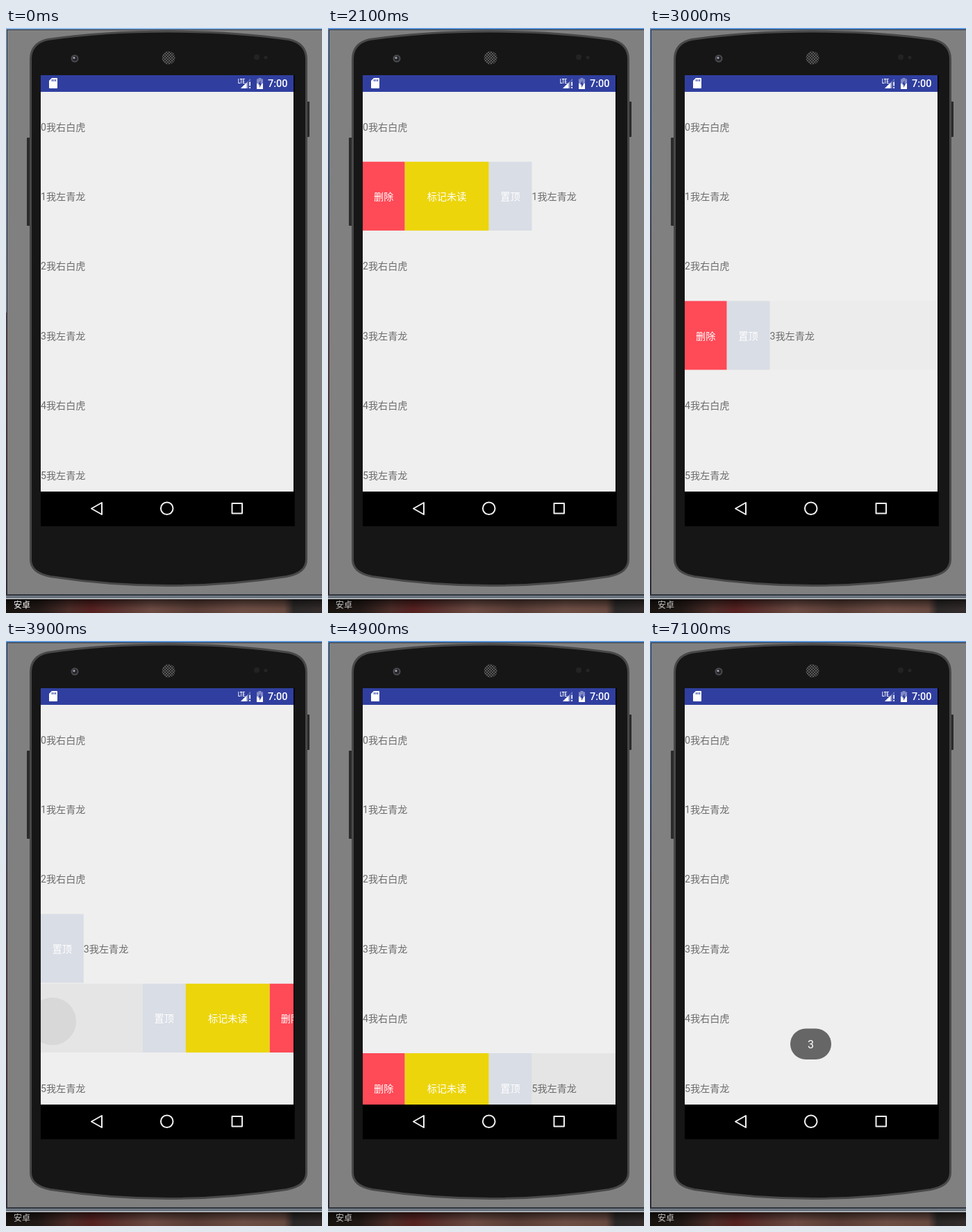
Write an HTML page that moves like this. It is 455 px wide and 843 px high and loops after 8 s.

```html
<!DOCTYPE html>
<html lang="zh">
<head>
<meta charset="utf-8">
<title>Swipe menu</title>
<style>
html, body { margin: 0; width: 100%; height: 100%; overflow: hidden; background: #808080; }
svg { display: block; }
text { font: 14.15px Roboto, "Noto Sans CJK SC", "Noto Sans CJK", sans-serif; }
.label { fill: #fff; text-anchor: middle; }
.item { fill: #6c6c6c; }
</style>
</head>
<body>
<svg id="stage" width="455" height="843" viewBox="0 0 455 843">
  <defs>
    <linearGradient id="desk" x2="0" y2="1">
      <stop stop-color="#5b93d6"/><stop offset=".23" stop-color="#3c6cae"/>
      <stop offset=".4" stop-color="#5c4a55"/><stop offset=".6" stop-color="#6d3c3c"/>
      <stop offset="1" stop-color="#30242a"/>
    </linearGradient>
    <linearGradient id="bar">
      <stop stop-color="#17130f"/><stop offset=".1" stop-color="#201815"/>
      <stop offset=".2" stop-color="#4b2c28"/><stop offset=".27" stop-color="#54201f"/>
      <stop offset=".36" stop-color="#5a3430"/><stop offset=".46" stop-color="#6b4a42"/>
      <stop offset=".6" stop-color="#583c35"/><stop offset=".75" stop-color="#6c4d44"/>
      <stop offset=".88" stop-color="#66483f"/><stop offset=".91" stop-color="#2a2727"/>
      <stop offset="1" stop-color="#332c2b"/>
    </linearGradient>
    <linearGradient id="shade" x2="0" y2="1">
      <stop stop-opacity=".55"/><stop offset=".7" stop-opacity="0"/>
    </linearGradient>
    <pattern id="mesh" width="4" height="4" patternUnits="userSpaceOnUse">
      <rect width="4" height="4" fill="#222"/>
      <circle cx="1" cy="1" r="1" fill="#6a6a6a"/><circle cx="3" cy="3" r="1" fill="#6a6a6a"/>
    </pattern>
  </defs>

  <!-- desktop and emulator window -->
  <rect width="455" height="843" fill="url(#desk)"/>
  <rect id="glow" width="455" height="410" fill="#a9ccf2" opacity=".6"/>
  <rect x="1.5" y="2.5" width="460" height="814" fill="#808080" stroke="#2b2f38"/>
  <rect y="817" width="455" height="6" fill="#6e7781"/>
  <path d="M0 817.5H455" stroke="#3a4048"/>
  <path d="M0 822.5H455" stroke="#dfe5ea"/>
  <rect y="823" width="455" height="20" fill="url(#bar)"/>
  <rect y="823" width="455" height="20" fill="url(#shade)"/>
  <text id="task" x="11" y="835.5" style="font-size:12px">安卓</text>

  <!-- phone body -->
  <rect x="30" y="158" width="5" height="127" rx="1" fill="#2b2b2b"/>
  <rect x="432" y="106" width="5" height="51" rx="1" fill="#2b2b2b"/>
  <path d="M35.500 45Q35.500 22 60 16.500Q140 5 234 5Q328 5 407 16.500Q432.500 22 432.500 45V766Q432.500 785 404 790.500Q320 803.500 234 803.500Q150 803.500 64 790.500Q35.500 785 35.500 766Z"
    fill="#161616" stroke="#484848" stroke-width="3"/>
  <circle cx="99" cy="44" r="5.500" fill="#4b4b4d"/>
  <circle cx="99" cy="44" r="3.500" fill="#22242c"/>
  <circle cx="98" cy="43" r="1.600" fill="#aaaab4"/>
  <circle cx="234" cy="43" r="9.500" fill="url(#mesh)"/>
  <circle cx="361" cy="42" r="4" fill="#232323"/>
  <circle cx="374" cy="42.500" r="2.500" fill="#252525"/>

  <!-- screen -->
  <rect x="50" y="68" width="365.500" height="650"/>
  <rect x="50" y="92" width="364" height="576" fill="#efefef"/>
  <g id="list"></g>
  <rect x="50" y="68" width="364" height="24" fill="#303f9f"/>
  <g fill="#fff">
    <path d="M66 72H73Q74 72 74 73V86Q74 87 73 87H63Q62 87 62 86V76Z"/>
    <path d="M66.500 74v3M69 74v3M71.500 74v3" stroke="#303f9f" stroke-width="1.200"/>
    <text x="334" y="79.500" style="font-size:8.500px;font-weight:700" textLength="10" lengthAdjust="spacingAndGlyphs">LTE</text>
    <path d="M352 73V87H338Z" opacity=".35"/>
    <path d="M346.500 78.500V87H338Z"/>
    <path d="M349 76h4v12h-4z" fill="#303f9f"/>
    <path d="M350.300 77.500h1.700v6h-1.700zM350.300 85h1.700v2h-1.700z"/>
    <path d="M363.500 72h4v1.500h2.500V80H361V73.500h2.500Z" opacity=".4"/>
    <path d="M361 80h9v8h-9z"/>
    <path d="M366.500 75.500L363 81.500H365V86L368.300 80H366.500Z" fill="#303f9f"/>
    <text x="377" y="85.300" style="font-size:14.500px;font-weight:500">7:00</text>
  </g>
  <rect x="50" y="668" width="365.500" height="50"/>
  <g fill="none" stroke="#f0f0f0" stroke-width="2" stroke-linejoin="round">
    <path d="M123 692.500L138 684V701Z"/>
    <circle cx="231.700" cy="692.300" r="8.800"/>
    <rect x="325.500" y="685" width="14.500" height="14.500"/>
  </g>
  <g id="toast">
    <rect x="202" y="558.500" width="59" height="44.500" rx="22.200" fill="#666"/>
    <text class="label" x="231.500" y="587" style="font-size:16px">3</text>
  </g>
</svg>
<script>
const LOOP = 8000, STEP = 100, WIDTH = 364, HEIGHT = 99.5, PITCH = 100.4;
const $ = id => document.getElementById(id);
const clamp = v => Math.max(0, Math.min(1, v));

const TOP = ['置顶', 62, '#d9dde5'], UNREAD = ['标记未读', 121, '#ecd50b'], DELETE = ['删除', 60.5, '#ff4a57'];

// swipe: drag start, drag end, close start; press: [down, up] times of the highlight
const rows = [
  { swipe: [640, 980, 1411], press: [[640, 1000]] },
  { swipe: [1430, 1745, 2230], press: [[1450, 1900]] },
  { press: [[2200, 2700]] },
  { swipe: [2850, 2990, 3636], press: [[2900, 3300], [6600, 7000]] },
  { swipe: [3660, 3929, 4340], press: [[3550, 4200]], ripple: [234, 54.5] },
  { swipe: [4360, 4720, 5400], press: [[4400, 5500]] }
];

function add(parent, tag, attrs, text = '') {
  const el = document.createElementNS('http://www.w3.org/2000/svg', tag);
  for (const key in attrs) el.setAttribute(key, attrs[key]);
  el.textContent = text;
  return parent.appendChild(el);
}

rows.forEach((row, i) => {
  const left = i % 2 === 1;
  const menu = i % 3 ? [TOP, UNREAD, DELETE] : [TOP, DELETE];
  const box = add($('list'), 'svg', { x: 50, y: 92 + i * PITCH, width: WIDTH, height: HEIGHT, overflow: 'hidden' });
  row.content = add(box, 'g', {});
  row.shade = add(row.content, 'g', {});
  add(row.shade, 'rect', { width: WIDTH, height: HEIGHT, fill: '#e5e5e5' });
  if (row.ripple) row.circle = add(row.shade, 'circle', { cx: row.ripple[0], cy: row.ripple[1], fill: '#d8d8d8' });
  add(row.content, 'text', { y: 55.6, class: 'item' }, i + (left ? '我左青龙' : '我右白虎'));

  let total = 0;
  for (const [name, width, fill] of menu) {
    const x = left ? -total - width : WIDTH + total;
    add(row.content, 'rect', { x, width, height: HEIGHT, fill });
    add(row.content, 'text', { x: x + width / 2, y: 55.6, class: 'label' }, name);
    total += width;
  }
  row.reach = left ? total : -total;
});

// pulls back before it runs to its end
const anticipate = p => p * p * (3 * p - 2);

function offset({ swipe, reach }, t) {
  if (!swipe) return 0;
  const [start, end, close] = swipe;
  return t < close
    ? reach * clamp((t - start) / (end - start))
    : reach * (1 - anticipate(clamp((t - close) / 300)));
}

function draw(t) {
  for (const row of rows) {
    row.content.setAttribute('transform', `translate(${offset(row, t)})`);
    const alpha = Math.max(...row.press.map(([down, up]) => clamp(Math.min((t - down) / 300, (up - t) / 100))));
    row.shade.setAttribute('opacity', alpha);
    if (row.circle) row.circle.setAttribute('r', Math.max(0, (t - row.press[0][0]) / 10.2));
  }
  $('toast').setAttribute('opacity', clamp((t - 6650) / 400));
  const active = t < 700;
  $('glow').setAttribute('opacity', active ? 0.6 : 0);
  $('task').setAttribute('fill', active ? '#fff' : '#c4c4c4');
}

function frame() {
  const t = performance.now() % LOOP;
  draw(Math.floor(t / STEP) * STEP);
  requestAnimationFrame(frame);
}
frame();
</script>
</body>
</html>
```
